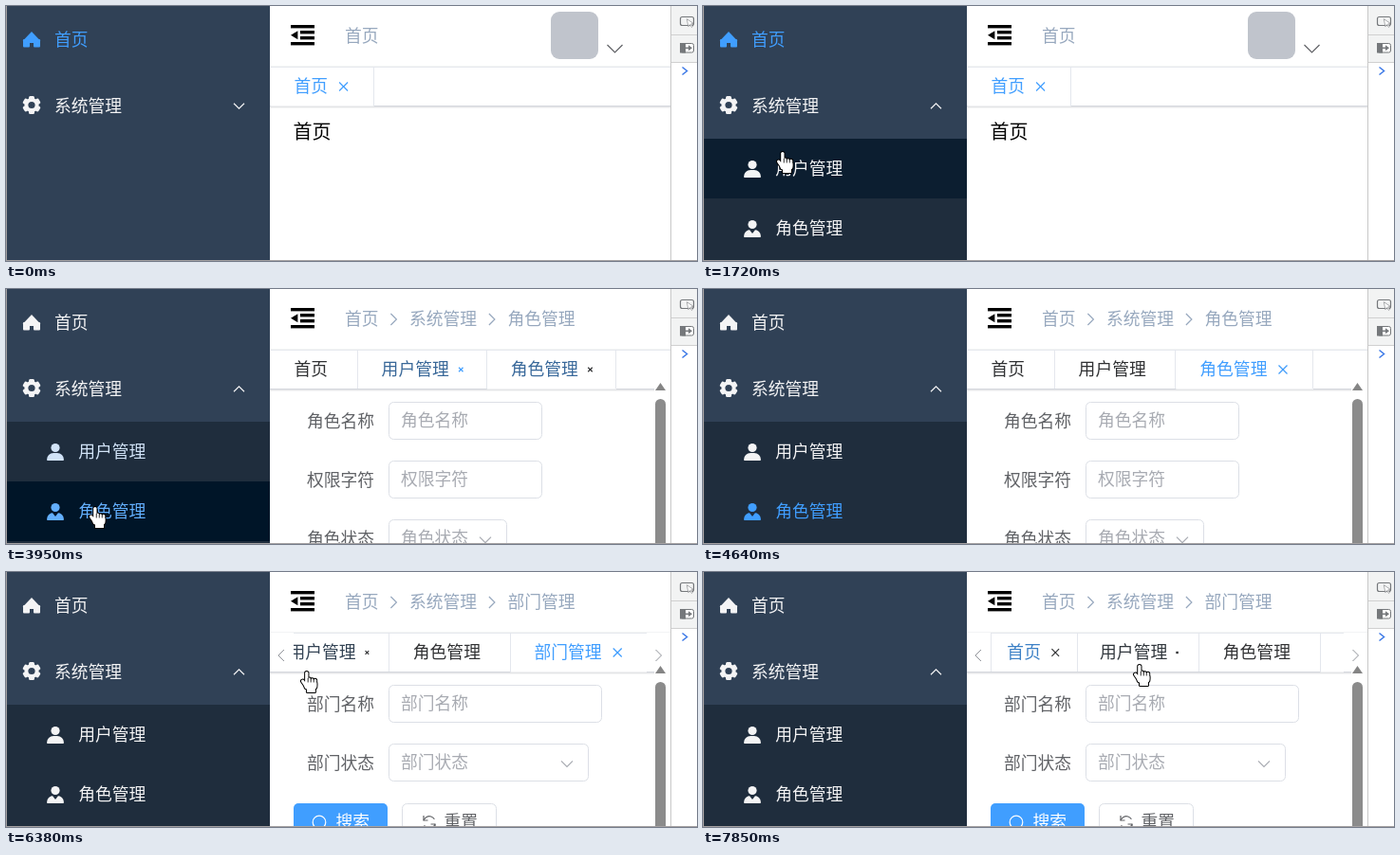
Write an HTML page with a canvas that moves like this. It is 728 px wide and 269 px high and loops after 8 s.

```html
<!DOCTYPE html>
<html lang="zh-CN">
<head>
<meta charset="utf-8">
<style>
html, body { margin: 0; width: 100%; height: 100%; overflow: hidden; background: #fff; }
canvas { display: block; width: 728px; height: 269px; }
</style>
</head>
<body>
<canvas id="stage" width="728" height="269"></canvas>
<script>
const ctx = document.getElementById('stage').getContext('2d');
const LOOP = 8000, LAST_CHANGE = 7850;
const GLYPH = 17.8;
const BLUE = [64, 158, 255], LIGHT = [244, 244, 245], DARK = [48, 49, 51];
const ROW = [31, 45, 61], ROW_HOVER = [0, 21, 40];
const GREY = '#606266', HINT = '#a8abb2', BORDER = '#dcdfe6', INK = '#75787b';

const PAGES = [
  { name: '首页', opened: -9999, picked: -9999 },
  { name: '用户管理', opened: 2430, picked: 2030 },
  { name: '角色管理', opened: 3950, picked: 3950 },
  { name: '部门管理', opened: 5360, picked: 5360 }
];

// Pointer stops: time, x, y
const STOPS = [
  [120, 65, 238], [480, 56, 117], [780, 56, 106], [1450, 56, 106], [1720, 77, 153],
  [2430, 79, 158], [2940, 99, 206], [3240, 87, 229], [4070, 87, 229], [4520, 95, 272],
  [5780, 332, 272], [6380, 310, 104], [6800, 283, 90], [7310, 283, 90], [7850, 453, 97]
];

const ramp = (t, start, span) => Math.min(1, Math.max(0, (t - start) / span));
const ease = u => u * u * (3 - 2 * u);
const mix = (a, b, p) => `rgb(${a.map((v, i) => Math.round(v + (b[i] - v) * p))})`;
const bump = (t, enter, leave) => ramp(t, enter, 200) - ramp(t, leave, 200);

// Fades run for 300 ms; the first visible step is already `lead` ms into the fade.
const fade = (t, start, lead) => t < start ? 0 : ramp(t, start - lead, 300);
function active(t, i, event, lead) {
  const next = PAGES[i + 1];
  return fade(t, PAGES[i][event], lead) - (next ? fade(t, next[event], lead) : 0);
}

function rect(x, y, w, h, color) {
  ctx.fillStyle = color;
  ctx.fillRect(x, y, w, h);
}

function text(str, x, midY, color, size = GLYPH) {
  ctx.font = `${size}px "Noto Sans CJK SC", "Noto Sans CJK", sans-serif`;
  ctx.fillStyle = color;
  ctx.fillText(str, x, midY + size * 0.345);
}

function line(points, color, width = 1.2) {
  ctx.beginPath();
  points.forEach(([x, y]) => ctx.lineTo(x, y));
  ctx.strokeStyle = color;
  ctx.lineWidth = width;
  ctx.stroke();
}

function poly(points, color) {
  ctx.beginPath();
  points.forEach(([x, y]) => ctx.lineTo(x, y));
  ctx.fillStyle = color;
  ctx.fill();
}

function disc(x, y, r, color) {
  ctx.beginPath();
  ctx.arc(x, y, r, 0, 7);
  ctx.fillStyle = color;
  ctx.fill();
}

function ring(x, y, r, color, from = 0, to = Math.PI * 2) {
  ctx.beginPath();
  ctx.arc(x, y, r, from, to);
  ctx.strokeStyle = color;
  ctx.lineWidth = 1.2;
  ctx.stroke();
}

function box(x, y, w, h, r, fill, stroke, width = 1) {
  ctx.beginPath();
  ctx.roundRect(x, y, w, h, r);
  if (fill) { ctx.fillStyle = fill; ctx.fill(); }
  if (stroke) { ctx.strokeStyle = stroke; ctx.lineWidth = width; ctx.stroke(); }
}

function at(x, y, draw, angle = 0) {
  ctx.save();
  ctx.translate(x, y);
  ctx.rotate(angle);
  draw();
  ctx.restore();
}

function clip(x, y, w, h, draw) {
  ctx.save();
  ctx.beginPath();
  ctx.rect(x, y, w, h);
  ctx.clip();
  draw();
  ctx.restore();
}

const chevronDown = (x, y, w, h, color) => line([[x - w, y - h], [x, y + h], [x + w, y - h]], color);
const chevronRight = (x, y, w, h, color, width) => line([[x - w, y - h], [x + w, y], [x - w, y + h]], color, width);
const triangle = (x, y, w, h, color) => poly([[x - w, y - h], [x + w, y - h], [x, y + h]], color);

function cross(x, y, r, color) {
  for (const s of [-1, 1]) line([[x - r, y - r * s], [x + r, y + r * s]], color);
}

function homeIcon(x, y, color) {
  triangle(x, y - 3, 9.5, -5, color);
  for (const side of [-9, 2]) box(x + side, y, 7, 8.5, 1, color);
  rect(x - 5, y, 10, 4, color);
}

function gearIcon(x, y, color) {
  for (let i = 0; i < 6; i++) {
    at(x, y, () => box(-3, -9.6, 6, 6, 1.5, color), i * Math.PI / 3);
  }
  disc(x, y, 7.5, color);
  disc(x, y, 3.6, '#304156');
}

function personIcon(x, y, color, collar, back) {
  disc(x, y - 4.5, 4.6, color);
  box(x - 9, y + 1, 18, 8, [7, 7, 1, 1], color);
  if (collar) triangle(x, y + 2.8, 3.5, 2.3, back);
}

function searchIcon(x, y, color) {
  ring(x, y, 6.8, color);
  line([[x + 5, y + 5], [x + 8, y + 8]], color);
}

function refreshIcon(x, y, color) {
  for (const turn of [0, Math.PI]) {
    at(x, y, () => {
      ring(0, 0, 6.3, color, 0.3, 2.6);
      line([[6, 7], [6, 2], [1.5, 2]], color);
    }, turn);
  }
}

function sidebar(t) {
  const tint = i => mix(LIGHT, BLUE, active(t, i, 'picked', 240));
  const open = ease(ramp(t, 1170, 280)) * (t >= 1210);
  rect(1, 0, 277, 268, '#304156');
  homeIcon(27, 35, tint(0));
  text('首页', 51, 36, tint(0));
  gearIcon(27, 104.5, '#f4f4f5');
  text('系统管理', 51, 106, '#f4f4f5');
  at(245.5, 105.5, () => chevronDown(0, 0, 5.5, 2.7, '#f4f4f5'), Math.PI * open);

  const hover = [bump(t, 1600, 2950), bump(t, 2950, 4300), 0];
  clip(1, 140, 277, 315 * open, () => hover.forEach((h, i) => {
    const y = 140 + 63 * i, back = mix(ROW, ROW_HOVER, h);
    rect(1, y, 277, 63, back);
    personIcon(52, y + 32, tint(i + 1), i === 1, back);
    text(PAGES[i + 1].name, 76.2, y + 31.7, tint(i + 1));
  }));
}

function header(page) {
  for (let i = 0; i < 4; i++) {
    const inset = i % 3 ? 10 : 0;
    rect(300 + inset, 20 + 6 * i, 25 - inset, 3.4, '#000');
  }
  at(303.7, 30.8, () => triangle(0, 0, 4.5, 3.7, '#000'), Math.PI / 2);

  const crumbs = page ? ['首页', '系统管理', PAGES[page].name] : ['首页'];
  let x = 357;
  crumbs.forEach((name, i) => {
    if (i) chevronRight(x - 16.5, 32, 3, 6, '#97a8be');
    text(name, x, 32, '#97a8be');
    x += name.length * GLYPH + 32.3;
  });
  if (!page) {
    box(574, 6, 50, 50, 9, '#c0c4cc');
    chevronDown(641.5, 45, 8, 4, GREY);
  }
}

function tabBar(t, page) {
  const nav = page === 3;
  const right = page ? 683 : 700;
  const left = nav ? 303 : 278.5;
  const width = nav ? 372 : right - left;
  rect(278, 63, 422, 1, '#f3f4f5');
  rect(left, 64, nav ? width : 422, 1, '#e6e9ee');
  ['#d5d8de', '#e4e5e7', '#f4f4f5'].forEach((color, i) => rect(278, 105 + i, right - 278, 1, color));

  const scroll = nav ? 119 * (ease(ramp(t, 5360, 250)) - (t >= 7070) * ease(ramp(t, 6980, 300))) : 0;
  const hover = [bump(t, 7450, 7820), bump(t, 6300, 6580) + bump(t, 7805, LOOP), 0, 0];

  clip(left, 63, width, 45, () => {
    let x = left - scroll;
    if (nav) rect(Math.round(x), 64, 1, 41, '#e4e7ed');
    PAGES.slice(0, page + 1).forEach(({ name, opened }, i) => {
      const on = active(t, i, 'opened', 150);
      const shown = Math.max(on, hover[i]);
      const textWidth = name.length * GLYPH;
      const tabWidth = textWidth + 56.5 + 17 * on;
      if (on > 0.5) rect(x, 105, tabWidth, 1, '#f0f1f3');
      rect(Math.round(x + tabWidth) - 1, 64, 1, 41, '#e4e7ed');

      const textX = x + 25 - 9 * hover[i];
      text(name, textX, 85, mix(DARK, BLUE, on || hover[i] ** 2));
      if (shown > 0) {
        const color = mix(DARK, BLUE, on && ramp(t, opened + 300, 400));
        cross(textX + textWidth + 8.5 + 8 * shown, 85, 4.5 * shown, color);
      }
      x += tabWidth;
    });
  });
  if (nav) {
    chevronRight(290, 88, -3, 6, '#909399', 1);
    chevronRight(687.5, 88, 3, 6, '#909399', 1);
  }
}

function field(label, row, width, select) {
  const y = 139.5 + 62.3 * row;
  text(label, 317, y, GREY);
  box(403.5, Math.round(y) - 20.5, width, 39, 5, '#fff', BORDER);
  text(label, 416, y - 1, HINT);
  if (select) chevronDown(403 + width - 22, y + 0.5, 6, 3, HINT);
}

function tree(names) {
  names.forEach((name, i) => {
    const x = 318 + 22.3 * i, y = 201 + 33 * i;
    if (i < names.length - 1) triangle(x, y, 5, 3, HINT);
    text(name, x + 14.5, y, GREY);
  });
}

const CONTENT = [
  () => text('首页', 302.5, 133, '#000', 20),
  () => {
    box(303.5, 119.5, 350, 39, 5, '#fff', BORDER);
    searchIcon(324, 138.5, HINT);
    text('请输入部门名称', 343.5, 138.5, HINT);
    tree(['ZQ科技', '深圳总公司', '研发部门']);
  },
  () => {
    field('角色名称', 0, 161);
    field('权限字符', 1, 161);
    field('角色状态', 2, 124, true);
  },
  () => {
    field('部门名称', 0, 224);
    field('部门状态', 1, 210, true);
    box(303, 244, 99, 40, 5, '#409eff');
    searchIcon(330, 264, '#fff');
    text('搜索', 347.5, 263.5, '#fff');
    box(417.5, 244.5, 99, 40, 5, '#fff', BORDER);
    refreshIcon(446, 264, GREY);
    text('重置', 461.5, 263.5, GREY);
  }
];

function scrollbar() {
  triangle(689.5, 103, 5.5, -4, '#858585');
  box(684, 116, 11, 170, 5.5, '#8b8b8b');
}

const ARROW = new Path2D('M.5 .5V17L4.3 13.4L7 19.5L9.5 18.4L6.9 12.5H12.2Z');

function arrow(color) {
  ctx.fillStyle = '#fff';
  ctx.strokeStyle = color;
  ctx.lineWidth = 1.1;
  ctx.fill(ARROW);
  ctx.stroke(ARROW);
}

function hand() {
  const parts = [[4.5, 11, 13, 8.5, 3], [7, 15, 9, 8, 0.5], [5.2, 1, 3.3, 15, 1.6]];
  for (let i = 1; i < 4; i++) parts.push([5.2 + 3 * i, 7 + 0.6 * i, 3, 8, 1.5]);
  const thumb = (fill, stroke) =>
    at(1.8, 11, () => box(-1, -1, 3.2, 11, 1.6, fill, stroke, 2), -0.6);
  parts.forEach(p => box(...p, null, '#000', 2));
  thumb(null, '#000');
  parts.forEach(p => box(...p, '#fff'));
  thumb('#fff');
  for (let i = 1; i < 4; i++) rect(4.8 + 3 * i, 8, 0.8, 4.5, '#000');
}

function devtools() {
  rect(700, 0, 28, 269, '#fff');
  rect(700, 0, 28, 59, '#f2f3f3');
  for (const y of [30, 59]) rect(700, y, 28, 1, '#d0d0d0');
  rect(700, 0, 1, 268, '#c8c8c8');
  box(710.5, 11.5, 14, 9, 2, null, INK, 1.2);
  at(717, 13.5, () => {
    ctx.scale(0.5, 0.5);
    arrow(INK);
  }, -0.2);
  box(710.5, 39.5, 14, 9.5, 2, '#fff', INK);
  rect(710, 39, 6, 10.5, INK);
  line([[716, 44.3], [720, 44.3]], INK, 1.5);
  at(721, 44.3, () => triangle(0, 0, 3, 2, INK), -Math.PI / 2);
  chevronRight(715, 68.5, 2.5, 4, '#3b78e7', 1.5);
}

function pointer(t) {
  if (t < STOPS[0][0]) return;
  const next = Math.max(1, STOPS.findIndex(([time]) => time >= t));
  const [ta, xa, ya] = STOPS[next - 1];
  const [tb, xb, yb] = STOPS[next];
  const p = ramp(t, ta, tb - ta);
  const x = xa + (xb - xa) * p, y = ya + (yb - ya) * p;
  const overBlank = (t < 1000 && y > 140) || (x > 278 && y > 106);
  at(x, y, overBlank ? () => arrow('#000') : hand);
}

function render(time) {
  const t = Math.min(time, LAST_CHANGE);
  const page = PAGES.filter(({ opened }) => opened <= t).length - 1;
  rect(0, 0, 728, 269, '#fff');
  sidebar(t);
  header(page);
  CONTENT[page]();
  tabBar(t, page);
  if (page) scrollbar();
  devtools();
  pointer(t);
  rect(0, 0, 1, 269, '#a3a0a1');
  rect(0, 268, 728, 1, '#a3a0a1');
}

const began = performance.now();
function tick() {
  render((performance.now() - began) % LOOP);
  requestAnimationFrame(tick);
}
tick();
</script>
</body>
</html>
```
